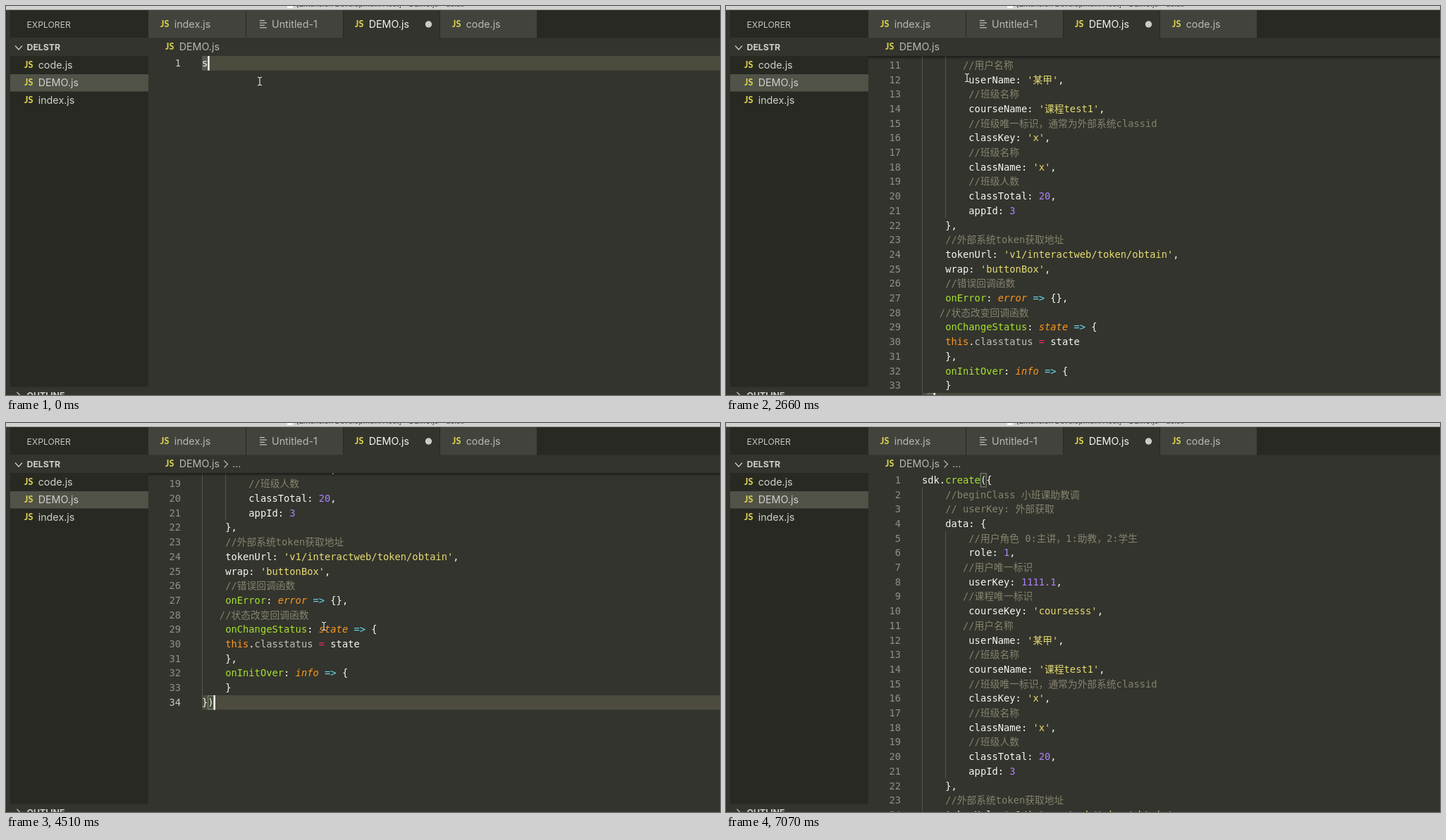
These frames come from a looping animation (1013x553 px, 7.79 s). An HTML page with a canvas:

```html
<!DOCTYPE html>
<html lang="zh-CN">
<head>
<meta charset="utf-8">
<title>Snippet completion</title>
<style>
  html, body { margin: 0; width: 100%; height: 100%; overflow: hidden; background: #33342d; }
  canvas { display: block; width: 1013px; height: 553px; }
</style>
</head>
<body>
<canvas width="1013" height="553"></canvas>
<script>
const ctx = document.querySelector('canvas').getContext('2d');
const W = 1013, H = 553, LOOP = 7790;
const ROW = 20.7, TOP = 71, LEFT = 278, CHAR = 8.29, BASELINE = 14.8;
const MONO = '13.77px "DejaVu Sans Mono", "Noto Sans CJK SC", monospace';
const BOLD = 'bold ' + MONO;
const UI = '14.3px Inter, sans-serif';
const EDITOR = '#33342d', DARK = '#282923', TAB = '#42433d', BORDER = '#75715e';
const WHITE = '#f8f8f2', GREY = '#b9b9b4', LIGHT = '#cfcfca', YELLOW = '#d8d04c', BLUE = '#75beff';

const CODE = `sdk.create({
    //beginClass 小班课助教调
    // userKey: 外部获取
    data: {
        //用户角色 0:主讲，1:助教，2:学生
        role: 1,
       //用户唯一标识
        userKey: 1111.1,
       //课程唯一标识
        courseKey: 'coursesss',
       //用户名称
        userName: '某甲',
        //班级名称
        courseName: '课程test1',
        //班级唯一标识，通常为外部系统classid
        classKey: 'x',
        //班级名称
        className: 'x',
        //班级人数
        classTotal: 20,
        appId: 3
    },
    //外部系统token获取地址
    tokenUrl: 'v1/interactweb/token/obtain',
    wrap: 'buttonBox',
    //错误回调函数
    onError: error => {},
   //状态改变回调函数
    onChangeStatus: state => {
    this.classtatus = state
    },
    onInitOver: info => {
    }
})`.split('\n');

const TOKEN = /(?<comment>\/\/.*)|(?<string>'[^']*')|(?<number>\b\d[\d.]*)|(?<param>\b\w+(?= =>))|(?<arrow>=>)|(?<assign>=)|(?<func>\b(?:create|on[A-Z]\w*))|(?<self>\bthis\b)|(?<prop>classtatus)|\w+|\s+|./g;
const COLORS = {
  comment: '#86836f', string: '#e6db74', number: '#ae81ff', param: '#fd971f', arrow: '#66d9ef',
  assign: '#f92672', func: '#a6e22e', self: '#fd971f', prop: '#bfbfb8'
};

// Event times in ms.
const SECOND_KEY = 110, THIRD_KEY = 440, HOVER = 680, LIST = 830, DOCS = 950;
const ACCEPT = 2510, INSERTED = 2660, SYMBOLS = 2920, MOUSE_GONE = 7070;

const smooth = u => u * u * (3 - 2 * u);
const easeOut = u => 1 - (1 - u) ** 2.5;
const glide = (t, start, duration, ease = smooth) =>
  ease(Math.min(1, Math.max(0, (t - start) / duration)));
// The screen updates in discrete ticks.
const tick = (t, step, phase) => Math.floor((t - phase) / step) * step + phase;

const caretOn = (t, since) => Math.floor(Math.max(0, t - since) / 500) % 2 === 0;

function scrollAt(time) {
  const t = tick(time, 186, 34);
  return 204 + 479 * glide(t, 3571, 380, easeOut) - 390 * glide(t, 3849, 900) - 293 * glide(t, 5335, 279);
}

function mouseAt(time) {
  const t = tick(time, 120, 110);
  const approach = glide(t, 1310, 480), back = glide(t, 2270, 240);
  const down = glide(t, 2700, 490), up = glide(t, 4800, 230);
  return [
    360 - 56 * approach + 38 * back + 109 * down - 13 * up + 554 * glide(t, 6340, 380),
    107 - 15 * approach + 10 * back + 187 * down - 62 * up + 319 * glide(t, 6480, 350)
  ];
}

function rect(x, y, w, h, color) {
  ctx.fillStyle = color;
  ctx.fillRect(x, y, w, h);
}

function frame(x, y, w, h, color) {
  ctx.strokeStyle = color;
  ctx.lineWidth = 1;
  ctx.strokeRect(x, y, w, h);
}

function text(str, x, y, color, font = UI, align = 'left') {
  ctx.font = font;
  ctx.fillStyle = color;
  ctx.textAlign = align;
  ctx.fillText(str, x, y);
  return ctx.measureText(str).width;
}

function path(d, color, width = 1.2, fill) {
  const shape = new Path2D(d);
  if (fill) {
    ctx.fillStyle = fill;
    ctx.fill(shape);
  }
  ctx.strokeStyle = color;
  ctx.lineWidth = width;
  ctx.stroke(shape);
}

function clipped(x, y, w, h, draw) {
  ctx.save();
  ctx.beginPath();
  ctx.rect(x, y, w, h);
  ctx.clip();
  draw();
  ctx.restore();
}

function codeLine(line, x, baseline) {
  for (const { 0: word, groups } of line.matchAll(TOKEN)) {
    const kind = Object.keys(groups).find(name => groups[name]);
    x += text(word, x, baseline, COLORS[kind] || WHITE, kind === 'param' ? 'italic ' + MONO : MONO);
  }
}

function jsFile(x, baseline, name, color) {
  text('JS', x, baseline - 1, YELLOW, '800 12.5px Lato, sans-serif');
  text(name, x + 19.7, baseline, color);
}

const chevronRight = (x, y, color) => path(`M${x} ${y - 5}l5 5l-5 5`, color);

function sidebar() {
  rect(6, 6, 196, 39, DARK);
  rect(6, 71, 196, 470.5, DARK);
  rect(6, 97, 196, 24.5, '#515248');
  text('EXPLORER', 29.5, 30.5, '#c5c5c0', '12.2px Inter, sans-serif');
  const heading = '700 12.3px Inter, sans-serif';
  text('DELSTR', 29.5, 62.5, LIGHT, heading);
  text('OUTLINE', 29.5, 558, LIGHT, heading);
  path('M13 56.5l5 5.5l5 -5.5', LIGHT);
  chevronRight(15.5, 554, LIGHT);
  ['code.js', 'DEMO.js', 'index.js'].forEach((name, i) => jsFile(26, 89 + i * 25, name, '#d0d0cb'));
}

function tabs() {
  const tabX = i => Math.round(202 + i * 137.8);
  rect(202, 6, W - 202, 39.5, DARK);
  rect(202, 6, tabX(4) - 202, 39.5, TAB);
  rect(tabX(2), 6, tabX(3) - tabX(2), 39.5, EDITOR);
  for (let i = 1; i < 4; i++) rect(tabX(i), 6, 1, 39.5, DARK);

  jsFile(219, 31, 'index.js', GREY);
  for (let i = 0; i < 4; i++) rect(360, 20 + i * 3.4, 7 + i % 2 * 3, 1.2, '#c5c5c0');
  text('Untitled-1', 377, 31, GREY);
  jsFile(495, 31, 'DEMO.js', '#f5f5f0');
  ctx.beginPath();
  ctx.arc(599.5, 26, 4.7, 0, 7);
  ctx.fillStyle = '#cbcbc7';
  ctx.fill();
  jsFile(633, 31, 'code.js', GREY);
}

function titleBar() {
  rect(0, 0, W, 5.5, '#d2d3d1');
  rect(399, 0, 8, 3, '#fafafa');
  text('[Extension Development Host] - DEMO.js - delstr', 412, 1, '#444', '10.4px Inter, sans-serif');
}

function breadcrumb(withSymbols) {
  jsFile(226, 63, 'DEMO.js', GREY);
  if (!withSymbols) return;
  chevronRight(309.5, 58.5, GREY);
  text('...', 321, 63, GREY);
}

const lineNumber = (n, y, active) =>
  text(n, 248, y + BASELINE, active ? '#c8c8c4' : '#90908a', MONO, 'right');
const rowHighlight = y => rect(LEFT, y, W - LEFT, ROW, '#4c4b3e');
const caret = (column, y) => rect(LEFT + column * CHAR, y, 2.4, ROW, WHITE);

function bracketBox(column, y) {
  rect(LEFT + column * CHAR, y + 1, CHAR, ROW - 2, 'rgba(0,100,0,.1)');
  frame(LEFT + column * CHAR + .3, y + .8, CHAR - .3, ROW - 1.6, '#8b8b82');
}

function typingView(t) {
  const typed = 'sdk'.slice(0, 1 + (t >= SECOND_KEY) + (t >= THIRD_KEY));
  rowHighlight(TOP);
  rect(LEFT, TOP, typed.length * CHAR, ROW, 'rgba(105,105,105,.4)');
  lineNumber(1, TOP, true);
  codeLine(typed, LEFT, TOP + BASELINE);
  if (caretOn(t, THIRD_KEY)) caret(typed.length, TOP);
  if (t >= LIST) suggestions();
  if (t >= DOCS) documentation();
}

function suggestions() {
  rect(303.5, 92.5, 380, 40.5, EDITOR);
  rect(304, 93, 379, 20, '#4e4f47');
  frame(303.5, 92.5, 380, 40.5, BORDER);

  path('M312.5 109V95.5h14V109', '#d0d0cc', 1);
  ctx.setLineDash([1.5, 1.5]);
  path('M312.5 109.5h14', '#d0d0cc', 1);
  ctx.setLineDash([]);
  path('M315 118.5h-3v11h3M323.5 118.5h3v11h-3', BLUE);
  path('M315.5 123l4 -2.2l3.5 1.7v2.8l-4 2.2l-3.5 -1.8zl3.5 1.6l4 -2.1', BLUE);

  text('sdk', 332, 107, WHITE, BOLD);
  let x = 332;
  for (const part of 'Media|S|treamTrac|k|Au|d|ioSourceNode'.split('|'))
    x += text(part, x, 128, WHITE, part.length === 1 ? BOLD : MONO);
}

function documentation() {
  rect(683.5, 92.5, 340, 247.5, EDITOR);
  clipped(684, 93, 329, 246.5, () => {
    text('双师互动系统sdk代码提示 (KV-WU)', 690, 111.5, '#c8c8c3', MONO);
    CODE.slice(0, 11).forEach((line, i) => codeLine(line, 690, 150 + i * 20));
  });
  frame(683.5, 92.5, 340, 247.5, BORDER);
}

function snippetView(t) {
  const scroll = scrollAt(t), last = CODE.length;
  const rowY = n => TOP + (n - 1) * ROW - scroll;
  const indentGuide = (column, from, to) =>
    rect(Math.round(LEFT + column * CHAR), rowY(from), 1, (to - from) * ROW, '#55564d');

  clipped(202, TOP, W - 202, H - TOP, () => {
    rowHighlight(rowY(last));
    indentGuide(0, 2, last);
    indentGuide(4, 5, 22);
    bracketBox(10, rowY(1));
    bracketBox(1, rowY(last));
    CODE.forEach((line, i) => {
      const y = rowY(i + 1);
      if (y < TOP - ROW || y > H) return;
      lineNumber(i + 1, y, i + 1 === last);
      codeLine(line, LEFT, y + BASELINE);
    });
    if (caretOn(t, ACCEPT)) caret(2, rowY(last));
    if (scroll > 0) {
      const shadow = ctx.createLinearGradient(0, TOP, 0, TOP + 5);
      shadow.addColorStop(0, 'rgba(0,0,0,.45)');
      shadow.addColorStop(1, 'rgba(0,0,0,0)');
      rect(202, TOP, W - 202, 5, shadow);
    }
  });
}

function mouse(t) {
  if (t >= MOUSE_GONE) return;
  ctx.save();
  ctx.translate(...mouseAt(t));
  if (t >= HOVER && t < INSERTED) {
    path('M0 0v12l2.7 -2.4l1.8 4l2 -.9l-1.7 -3.9l3.7 -.2z', '#e8e8e8', 1, '#111');
  } else {
    const beam = 'M-3 -6l3 1l3 -1M0 -5v10M-3 6l3 -1l3 1';
    path(beam, '#22231e', 2.6);
    path(beam, '#f0f0ec');
  }
  ctx.restore();
}

function render(now) {
  const t = now % LOOP;
  rect(0, 0, W, H, EDITOR);
  sidebar();
  tabs();
  titleBar();
  breadcrumb(t >= SYMBOLS);
  if (t < INSERTED) typingView(t);
  else snippetView(t);
  mouse(t);
  requestAnimationFrame(render);
}
requestAnimationFrame(render);
</script>
</body>
</html>
```
